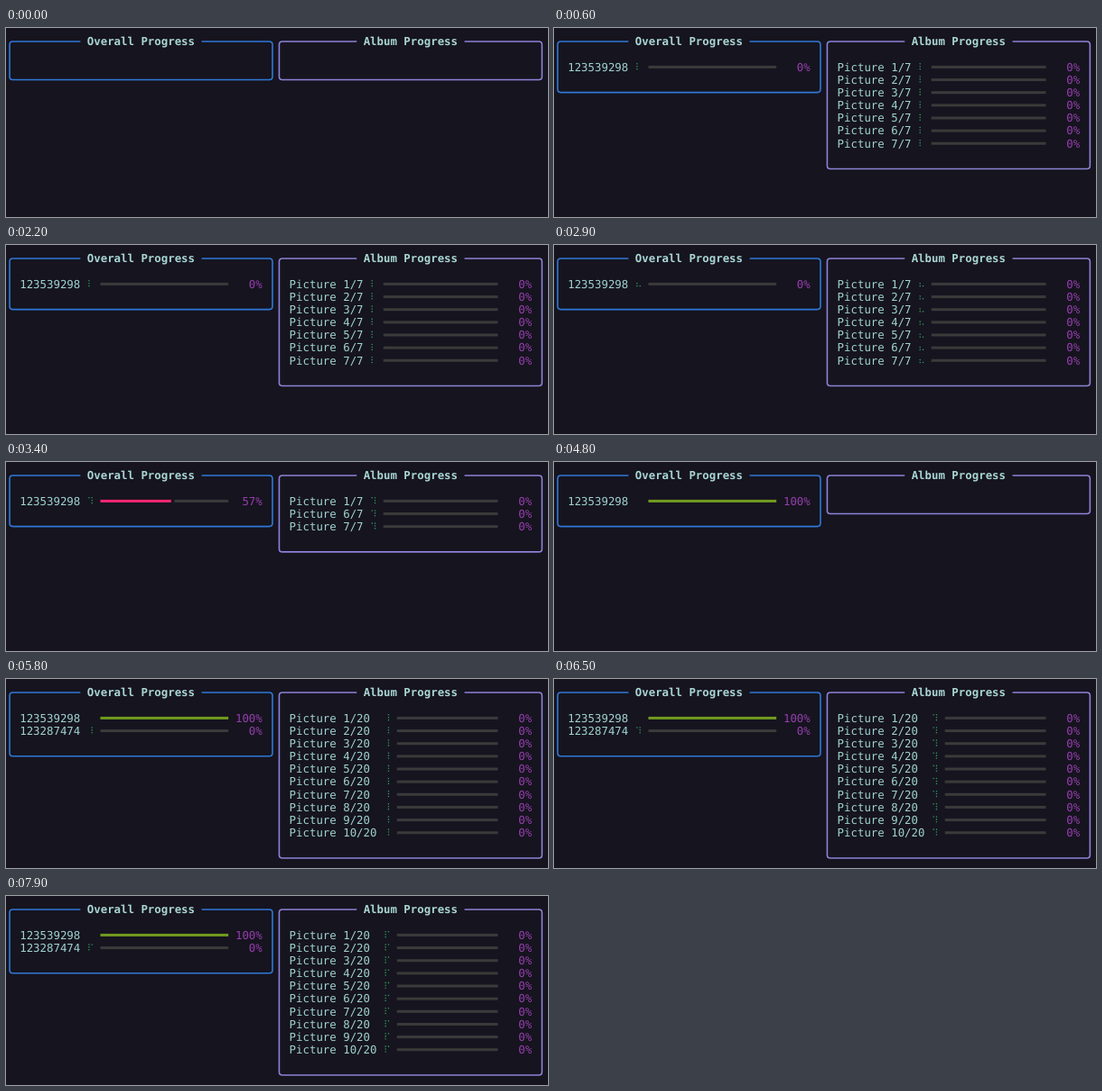
Write an HTML page that moves like this. It is 600 px wide and 210 px high and loops after 8 s.

```html
<!DOCTYPE html>
<html lang="en">
<head>
<meta charset="utf-8">
<title>Download progress</title>
<style>
  html, body { margin: 0; width: 100%; height: 100%; overflow: hidden; background: #16141f; }
  svg { display: block; }
  text {
    font: 12.39px "DejaVu Sans Mono", "Noto Sans Mono", monospace;
    white-space: pre;
    text-rendering: geometricPrecision;
    fill: #9fd3d0;
  }
  .title { font-weight: bold; fill: #a9d6d4; }
  .pct { fill: #963fae; }
  .panel { fill: none; stroke-width: 1.6; }
</style>
</head>
<body>
<svg id="stage" width="600" height="210" viewBox="0 0 600 210"></svg>
<script>
const stage = document.getElementById("stage");
const LOOP = 8000, TICK = 100;
const CELL_W = 7.46, ROW_H = 14.15;
const BLUE = "#2f78d6", VIOLET = "#8c83d6";
const PINK = "#f92672", GREEN = "#729c1f", TRACK = "#3a3a3a", SPIN = "#2d9a5f";
const SPINNER = "⠋⠙⠹⠸⠼⠴⠦⠧⠇⠏";

// Ticks at which no fresh render has arrived, so the spinner is held
const HOLDS = [-4, 4, 12, 20, 28, 44, 62, 66, 70, 80];
// Ticks at which each picture finishes, and the order they finish in
const DONE_AT = [30, 31, 32, 33, 36, 46, 48];
const ORDER = [2, 3, 4, 5, 6, 1, 7];

const colX = c => 0.3 + c * CELL_W;
const rowY = r => 15 + r * ROW_H;

const text = (c, r, str, cls = "") =>
  `<text x="${colX(c)}" y="${rowY(r) + 4.4}" class="${cls}">${str}</text>`;

const strip = (from, to, r, color) =>
  `<rect x="${colX(from) - 0.3}" y="${rowY(r) - 1.4}" width="${(to - from) * CELL_W}" height="3" fill="${color}"/>`;

function panel(c, rows, title, color) {
  const left = colX(c + 0.5), right = colX(c + 39.5);
  const top = rowY(0), bottom = rowY(rows ? rows + 3 : 3), R = 3.5;
  const pad = Math.floor((38 - title.length - 2) / 2) + 1;
  const gapL = colX(c + pad), gapR = colX(c + pad + title.length + 2);
  return `<path class="panel" stroke="${color}" d="M${gapL} ${top}H${left + R}
    Q${left} ${top} ${left} ${top + R}V${bottom - R}
    Q${left} ${bottom} ${left + R} ${bottom}H${right - R}
    Q${right} ${bottom} ${right} ${bottom - R}V${top + R}
    Q${right} ${top} ${right - R} ${top}H${gapR}"/>` +
    text(c + pad + 1, 0, title, "title");
}

function spinner(c, r, glyph) {
  const bits = glyph.codePointAt(0) - 0x2800;
  let out = "";
  for (let i = 0; i < 6; i++) {
    if (!(bits >> i & 1)) continue;
    const x = colX(c) + (i < 3 ? 2.1 : 5.4);
    const y = rowY(r) - 3.5 + (i % 3) * 2.9;
    out += `<circle cx="${x}" cy="${y}" r="0.8" fill="${SPIN}"/>`;
  }
  return out;
}

// The bar advances by half cells, with a half-cell gap after the filled part
function bar(from, to, r, ratio) {
  if (ratio >= 1) return strip(from, to, r, GREEN);
  const halves = Math.floor((to - from) * 2 * ratio);
  if (!halves) return strip(from, to, r, TRACK);
  return strip(from, from + halves / 2, r, PINK) +
    strip(from + (halves + 1) / 2, to, r, TRACK);
}

function task(c, r, name, nameW, ratio, glyph) {
  const pct = Math.round(ratio * 100) + "%";
  return text(c, r, name) +
    (ratio < 1 ? spinner(c + nameW + 1, r, glyph) : "") +
    bar(c + nameW + 3, c + 31, r, ratio) +
    text(c + 36 - pct.length, r, pct.padStart(0), "pct");
}

function spinnerAt(tick) {
  const i = HOLDS.findIndex(h => h > tick);
  const start = HOLDS[i - 1], end = HOLDS[i] - 1;
  const lag = TICK * (end - tick) / (end - start);
  return SPINNER[Math.floor((tick * TICK - lag) / 81 + 1.76) % 10];
}

function render(tick) {
  const glyph = spinnerAt(tick);
  const done = DONE_AT.filter(t => t <= tick).length;
  const albums = [], pictures = [];
  let total = 7;

  if (tick >= 1) albums.push(["123539298", done / 7]);
  if (tick >= 58) {
    albums.push(["123287474", 0]);
    total = 20;
    for (let n = 1; n <= 10; n++) pictures.push(n);
  } else if (tick >= 1) {
    pictures.push(...ORDER.slice(done).sort());
  }

  const nameW = total === 7 ? 11 : 13;
  stage.innerHTML =
    panel(0, albums.length, "Overall Progress", BLUE) +
    panel(40, pictures.length, "Album Progress", VIOLET) +
    albums.map(([id, ratio], i) => task(2, 2 + i, id, 9, ratio, glyph)).join("") +
    pictures.map((n, i) => task(42, 2 + i, `Picture ${n}/${total}`, nameW, 0, glyph)).join("");
}

let shown = -1;
function frame() {
  const tick = Math.floor(performance.now() % LOOP / TICK);
  if (tick !== shown) render(shown = tick);
  requestAnimationFrame(frame);
}
frame();
</script>
</body>
</html>
```
